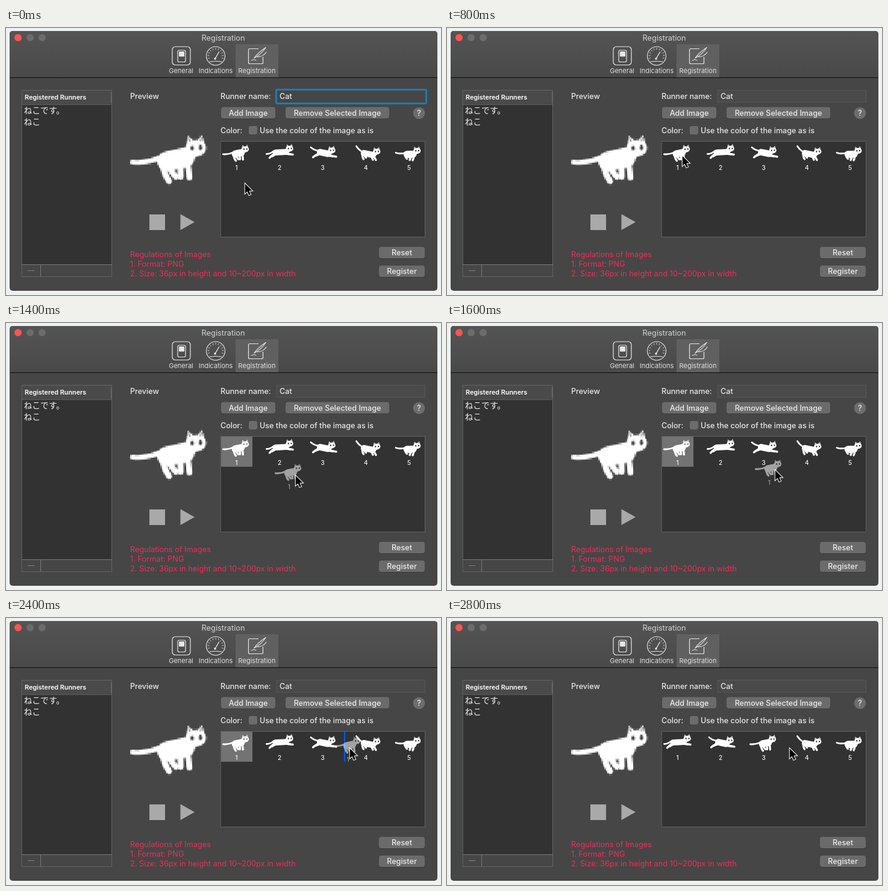
Animation, 722 px wide and 444 px high, one loop 3000 ms. Source, as an HTML page with a canvas:

```html
<!DOCTYPE html>
<html lang="en">
<head>
<meta charset="utf-8">
<title>Registration</title>
<style>
html, body { margin: 0; width: 100%; height: 100%; overflow: hidden; background: #eef1f1; }
canvas { display: block; }
</style>
</head>
<body>
<canvas id="stage" width="722" height="444"></canvas>
<script>
const ctx = document.getElementById('stage').getContext('2d');
const LOOP = 3000, STEP = 100;
const SANS = 'Inter, Roboto, sans-serif';
const KANA = '500 13.8px "Noto Sans CJK JP", "Noto Sans CJK", sans-serif';
const BODY = '500 12.6px ' + SANS;
const INK = '#e8e8e8';

// ---- helpers ----
function rect(x, y, w, h, fill) {
  ctx.fillStyle = fill;
  ctx.fillRect(x, y, w, h);
}

function round(x, y, w, h, r, fill, stroke, line = 1) {
  ctx.beginPath();
  ctx.roundRect(x, y, w, h, r);
  if (fill) { ctx.fillStyle = fill; ctx.fill(); }
  if (stroke) { ctx.strokeStyle = stroke; ctx.lineWidth = line; ctx.stroke(); }
}

function disc(x, y, r, fill) {
  ctx.beginPath();
  ctx.arc(x, y, r, 0, Math.PI * 2);
  ctx.fillStyle = fill;
  ctx.fill();
}

function text(s, x, y, font = BODY, fill = '#e8e8e8', align = 'left') {
  ctx.font = font;
  ctx.fillStyle = fill;
  ctx.textAlign = align;
  ctx.fillText(s, x, y);
}

function poly(c, pts, close) {
  c.beginPath();
  for (const p of pts) c.lineTo(...p);
  if (close) c.closePath();
}

// curve from a to b, pulled towards k
function curve(c, width, a, k, b) {
  c.lineWidth = width;
  c.lineCap = c.lineJoin = 'round';
  c.beginPath();
  c.moveTo(...a);
  c.quadraticCurveTo(...k, ...b);
  c.stroke();
}

const add = (p, x, y) => [p[0] + x, p[1] + y];
const mid = (a, b) => [(a[0] + b[0]) / 2, (a[1] + b[1]) / 2];

// ---- running cats: a few joints each, the rest follows ----
const cats = [
  { head: [38, 8.7], rump: [21.5, 16.3], tail: [1.3, 16.8], hind: [22.5, 27.8], fore: [34.3, 25.8] },
  { head: [39.7, 7.6], rump: [16.5, 14], tail: [1.5, 16.5], hind: [6.5, 23], fore: [45, 17.5] },
  { head: [38.7, 10.6], rump: [19.5, 13.5], tail: [4, 5.5], hind: [7.5, 22], fore: [46, 21] },
  { head: [41.3, 12.6], rump: [20, 15], tail: [7.5, 3.5], hind: [19.5, 25], fore: [40, 26.5] },
  { head: [37.2, 11.3], rump: [20.5, 17], tail: [2, 14.5], hind: [20.5, 24.5], fore: [30, 27] }
];
const PAD = 2, PIXEL = 2.5, ZOOM = 2.86;

function leg(c, hip, foot, bend) {
  curve(c, 3.4, hip, add(mid(hip, foot), bend, 0.5), foot);
}

function head(c, at) {
  c.translate(...at);
  c.rotate(-0.06);
  c.beginPath();
  c.ellipse(0, 0, 6.1, 4.9, 0, 0, 7);
  c.fill();
  for (const side of [-1, 1]) {
    poly(c, [[5.4 * side, -1.5], [4.1 * side, -7.4], [0.8 * side, -4.2]], true);
    c.fill();
  }
  // eyes and ear hollows show what lies behind
  c.globalCompositeOperation = 'destination-out';
  for (const side of [-1, 1]) {
    c.beginPath();
    c.ellipse(0.4 + 2.4 * side, -0.2, 1, 1.5, 0, 0, 7);
    c.fill();
    curve(c, 0.6, [3.7 * side, -5.8], [3.4 * side, -5], [3.2 * side, -4.2]);
  }
}

function sprite({ head: top, rump, tail, hind, fore }, scale) {
  const cv = document.createElement('canvas');
  cv.width = Math.ceil(50 * scale);
  cv.height = Math.ceil(34 * scale);
  const c = cv.getContext('2d');
  c.scale(scale, scale);
  c.translate(0, PAD);
  c.fillStyle = c.strokeStyle = '#fff';
  const chest = add(top, -6.5, 5.5);
  const girth = 14.5 - 0.28 * (chest[0] - rump[0]);
  const root = add(rump, -3, -2.5);
  curve(c, 2.8, tail, add(mid(tail, root), 0, 2.5), root);
  curve(c, girth, rump, mid(rump, chest), chest);
  curve(c, 8, chest, mid(chest, top), top);
  leg(c, add(rump, -2.5, 2), hind, -1.5);
  leg(c, add(rump, 1, 2.5), add(hind, 4, -2.5), -1);
  leg(c, add(chest, 1.5, 2), fore, 0.5);
  leg(c, add(chest, -2, 2), add(fore, -5, -0.5), -0.5);
  head(c, top);
  return cv;
}

const small = cats.map(p => sprite(p, 1));
const large = sprite(cats[0], ZOOM / PIXEL);

function runner(id, label, cx, dy = 0) {
  ctx.drawImage(small[id], Math.round(cx - 23.5), 193 - PAD + Math.round(dy));
  text(label, cx, 236 + dy, '500 10px ' + SANS, '#f2f2f2', 'center');
}

// ---- window ----
function switchIcon() {
  round(276, 31, 30, 30.5, 5, null, INK, 1.2);
  round(285, 37, 13, 19.5, 2.5, null, INK, 1.2);
  round(287, 39, 9, 8.5, 1, INK);
}

function gaugeIcon() {
  const ray = (a, r) => [348 + r * Math.cos(a), 46.5 + r * Math.sin(a)];
  ctx.strokeStyle = INK;
  ctx.lineWidth = 1.1;
  ctx.beginPath();
  ctx.arc(348, 46.5, 15.5, 0, 7);
  ctx.stroke();
  for (let i = 0; i <= 10; i++) {
    const a = Math.PI * (0.9 + i * 0.12);
    curve(ctx, 0.9, ray(a, 11), ray(a, 12), ray(a, 13));
  }
  curve(ctx, 1.4, [347, 51], [350, 46], [353.5, 40]);
  disc(347, 51, 1.8, INK);
  curve(ctx, 1, [338, 56], [348, 54.5], [358, 56]);
}

function writeIcon() {
  round(402.5, 34.5, 24, 25, 2, null, INK, 1.2);
  rect(419, 33, 10, 15, '#606060');
  curve(ctx, 1.1, [412, 50], [417, 42], [431, 32.5]);
  curve(ctx, 1.1, [412, 50], [424, 44], [431, 32.5]);
  curve(ctx, 1.1, [417, 48], [427, 48], [432, 40]);
  curve(ctx, 1, [407, 54], [411, 51], [415, 53.5]);
}

function toolbar() {
  const g = ctx.createLinearGradient(0, 5, 0, 82);
  g.addColorStop(0, '#545454');
  g.addColorStop(1, '#494949');
  round(6, 5, 710, 77, [5, 5, 0, 0], g);
  rect(381, 27, 71, 55, '#606060');
  rect(6, 82, 710, 1, '#0c0c0c');
  ['#fb5550', '#6c6c6c', '#6c6c6c'].forEach((c, i) => disc(20 + 20 * i, 16, 6, c));
  text('Registration', 360.5, 21, '400 12.8px ' + SANS, '#d4d4d4', 'center');
  switchIcon();
  gaugeIcon();
  writeIcon();
  const tab = (s, x) => text(s, x, 75, '400 11px ' + SANS, '#e0e0e0', 'center');
  tab('General', 290.5);
  tab('Indications', 348);
  tab('Registration', 416.5);
}

function sidebar() {
  round(26.5, 103.5, 149, 310, 0, '#464646', '#646464');
  rect(27, 104, 148, 23, '#4a4a4a');
  rect(27, 127, 148, 1, '#5c5c5c');
  rect(174, 107, 1, 18, '#686868');
  rect(27, 128, 148, 265, '#323232');
  rect(26, 393, 150, 1, '#7a7a7a');
  rect(57, 394, 1, 19, '#7a7a7a');
  rect(36, 403, 11, 1, '#808080');
  text('Registered Runners', 31, 119, '600 10.8px ' + SANS, '#fff');
  ['ねこです。', 'ねこ'].forEach((s, i) => text(s, 29.5, 142 + 19 * i, KANA, '#f2f2f2'));
}

function preview() {
  text('Preview', 206, 118);
  ctx.imageSmoothingEnabled = false;
  ctx.drawImage(large, 206, 175 - PAD * ZOOM, large.width * PIXEL, large.height * PIXEL);
  ctx.imageSmoothingEnabled = true;
  rect(238, 310, 26, 26, '#a9a9a9');
  poly(ctx, [[289.5, 309.5], [289.5, 336], [313, 322.8]], true);
  ctx.fillStyle = '#a9a9a9';
  ctx.fill();
  ['Regulations of Images', '1. Format: PNG', '2. Size: 36px in height and 10~200px in width']
    .forEach((s, i) => text(s, 206, 381 + 16 * i, '400 12.8px ' + SANS, '#f02d58'));
}

function button(label, x, y, w) {
  round(x, y + 0.5, w, 19.5, 4, '#383838');
  round(x, y, w, 19, 4, '#6b6b6b');
  text(label, x + w / 2, y + 14.2, BODY, '#ececec', 'center');
}

function form(focused) {
  text('Runner name:', 356, 118);
  if (focused) round(448.5, 102.5, 249, 23, 2, '#454545', '#2179b3', 3);
  else round(449.5, 103.5, 246, 20, 0, '#4a4a4a', '#575757');
  text('Cat', 454, 118);
  button('Add Image', 357, 131.5, 90);
  button('Remove Selected Image', 464, 131.5, 172);
  disc(685.5, 141.5, 9.8, '#6d6d6d');
  text('?', 685.5, 146, '500 13px ' + SANS, '#ececec', 'center');
  text('Color:', 356, 175);
  round(403, 163, 14, 14, 3, '#6c6c6c');
  text('Use the color of the image as is', 421, 175);
  button('Reset', 619, 364, 76);
  button('Register', 619, 395, 76);
  round(356.5, 188.5, 339, 159, 0, '#323232', '#626262');
}

// ---- motion ----
const GRAB = 1000, LAND = 1820, RELEASE = 2700, DROP = 2800;
const span = (t, a, b) => Math.min(1, Math.max(0, (t - a) / (b - a)));
const ease = u => u * u * (3 - 2 * u);

// up to the first cat, over to the fourth in a sagging arc, then a nudge back
function pointer(t) {
  const reach = ease(span(t, 0, 600));
  const haul = span(t, GRAB, LAND);
  const nudge = ease(span(t, 2200, 2500));
  return [
    396 - 6 * reach + 187 * ease(haul) - 9 * nudge,
    258 - 46 * reach + 3 * haul + 40 * Math.sin(Math.PI * haul) + nudge
  ];
}

function list(t) {
  const dropped = t >= DROP;
  const order = dropped ? [1, 2, 0, 3, 4] : [0, 1, 2, 3, 4];
  if (t >= GRAB && !dropped) rect(357, 189, 52, 50, '#737373');
  order.forEach((id, i) => runner(id, i + 1, 382.5 + 71.6 * i));
  if (t >= 2300 && !dropped) rect(561, 189, 2, 50, '#0b5cd8');
  if (t >= GRAB && t < RELEASE) {
    const [x, y] = pointer(t - 20);
    ctx.globalAlpha = 0.55;
    runner(0, 1, x - 3.5, y - 213);
    ctx.globalAlpha = 1;
  }
}

function arrow([x, y]) {
  ctx.save();
  ctx.translate(Math.round(x) + 0.5, Math.round(y));
  poly(ctx, [[0.3, 1], [0.3, 17.3], [4, 13.8], [6.8, 20], [9.6, 18.8], [6.9, 12.8], [12, 12.6]], true);
  ctx.lineJoin = 'miter';
  ctx.lineWidth = 2;
  ctx.strokeStyle = '#fff';
  ctx.stroke();
  ctx.fillStyle = '#000';
  ctx.fill();
  ctx.restore();
}

function draw(now) {
  const t = Math.floor((now % LOOP) / STEP) * STEP;
  rect(0, 0, 722, 444, '#eef1f1');
  round(6, 5, 710, 432, 5, '#464646');
  toolbar();
  sidebar();
  preview();
  form(t < 700);
  list(t);
  arrow(pointer(t));
}

let start;
function tick(now) {
  start ??= now;
  draw(Math.max(0, now - start));
  requestAnimationFrame(tick);
}
draw(0);
requestAnimationFrame(tick);
</script>
</body>
</html>
```
